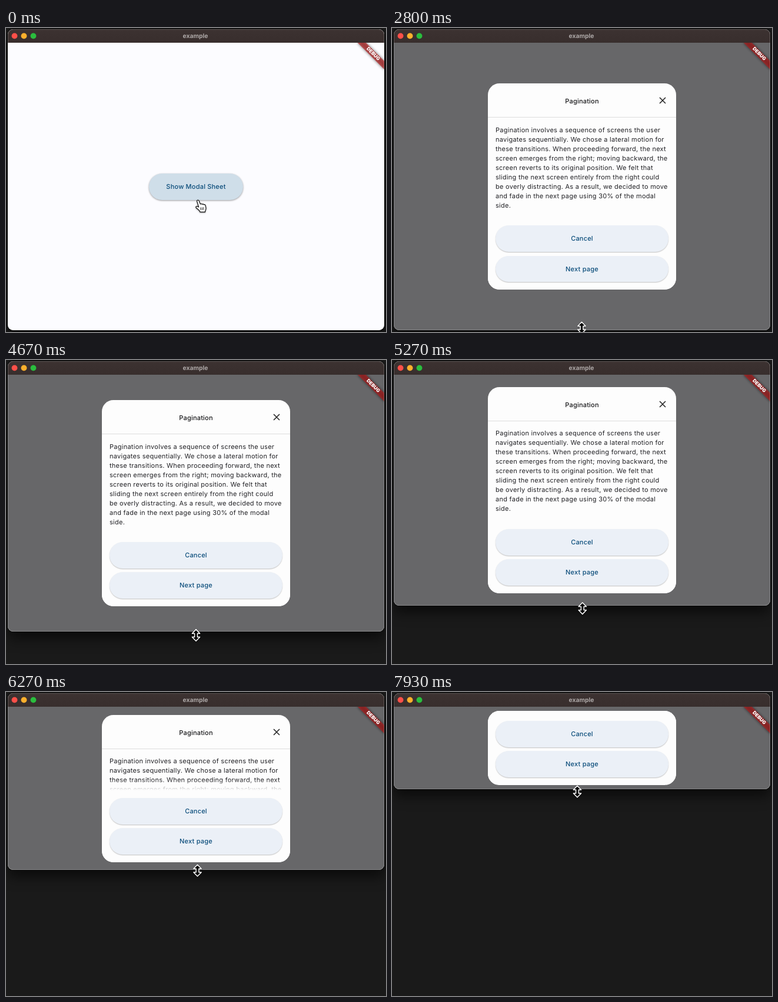
Write an HTML page that moves like this. It is 646 by 516 pixels and loops after 8000 ms.

```html
<!DOCTYPE html>
<html lang="en">
<head>
<meta charset="utf-8">
<title>Modal sheet</title>
<style>
html, body { margin: 0; width: 100%; height: 100%; overflow: hidden; background: #1a1a1a; }
body { position: relative; font: 400 11px/16px Inter, "Open Sans", sans-serif; text-rendering: geometricPrecision; }
div, svg { position: absolute; box-sizing: border-box; }
#win { left: 3px; top: 2px; width: 640px; border-radius: 9px; overflow: hidden; background: #fcfcff; }
#shadow, #rim { left: 3px; top: 2px; width: 640px; border-radius: 9px; }
#shadow { box-shadow: 0 0 0 1px #060606, 0 11px 22px rgba(0,0,0,.6); }
#rim { border: 1px solid rgba(255,255,255,.2); }
#bar { width: 640px; height: 23px; background: linear-gradient(#3c3231, #382e2d);
  font: 700 10.4px/23px Inter, sans-serif; color: #aca7a6; text-align: center; padding-right: 2px; }
#bar svg { left: 0; top: 0; stroke: rgba(0,0,0,.15); stroke-width: .6; }
#barrier { inset: 0; background: #000; }
.btn { height: 44.8px; border-radius: 22.4px; font-weight: 500; line-height: 45px; letter-spacing: .2px;
  text-align: center; color: #0b4d7b; background: #ebf0f7; box-shadow: 0 1px 1.5px rgba(0,0,0,.24); }
#show { left: 240px; width: 160px; background: #cfdee9; box-shadow: 0 1px 3px rgba(0,0,0,.4); }
#dialog { left: 160px; width: 320px; border-radius: 19.5px; overflow: hidden; background: #fdfdfd; color: #222226; }
#head { width: 320px; height: 58px; line-height: 60px; border-bottom: 1px solid #dcdcdc; text-align: center;
  font-weight: 500; letter-spacing: .2px; color: #18181a; }
#head svg { left: 291px; top: 23px; }
#text { left: 13px; top: 70.5px; white-space: pre; letter-spacing: .26px; }
#foot { bottom: 0; width: 320px; height: 140px; background: linear-gradient(rgba(253,253,253,0), #fdfdfd 18px); }
#foot .btn { left: 12.8px; width: 294.4px; }
#ribbon { left: 640px; top: 23px; width: 0; height: 0; transform: rotate(45deg); }
#ribbon div { left: -32px; top: 22.4px; width: 64px; height: 9.6px; }
#glow { background: rgba(0,0,0,.55); filter: blur(2.4px); }
#tag { background: rgba(183,28,28,.65); color: #fff; font: 900 8.16px/9.6px Inter, sans-serif; text-align: center; }
#cursors svg { left: 0; top: 0; overflow: visible; filter: drop-shadow(0 1px 1px rgba(0,0,0,.4)); }
</style>
</head>
<body>
<div id="shadow"></div>
<div id="win">
  <div id="show" class="btn">Show Modal Sheet</div>
  <div id="barrier"></div>
  <div id="dialog">
    <div id="head">Pagination
      <svg width="12" height="12"><path d="M1 1L11 11M11 1L1 11" stroke="#262626" stroke-width="1.6"/></svg>
    </div>
    <div id="text">Pagination involves a sequence of screens the user
navigates sequentially. We chose a lateral motion for
these transitions. When proceeding forward, the next
screen emerges from the right; moving backward, the
screen reverts to its original position. We felt that
sliding the next screen entirely from the right could
be overly distracting. As a result, we decided to move
and fade in the next page using 30% of the modal
side.</div>
    <div id="foot">
      <div class="btn" style="bottom:64px">Cancel</div>
      <div class="btn" style="bottom:12.8px">Next page</div>
    </div>
  </div>
  <div id="ribbon"><div id="glow"></div><div id="tag">DEBUG</div></div>
  <div id="bar">example
    <svg width="60" height="23">
      <circle cx="11.5" cy="11.5" r="5" fill="#fd5049"/>
      <circle cx="27.5" cy="11.5" r="5" fill="#fdb02d"/>
      <circle cx="43.5" cy="11.5" r="5" fill="#2bbd3e"/>
    </svg>
  </div>
</div>
<div id="rim"></div>
<div id="cursors">
  <svg id="hand" width="22" height="24" fill="#fff" stroke="#111" stroke-width="1.2" stroke-linejoin="round">
    <path d="M4.2 1.4c1.2-.8 2.5 0 3 1.2L9.4 8c1-1.2 2.6-.8 3 .4c1-1 2.6-.6 2.9.6c1.2-.7 2.5-.1 2.8 1.2l.8 4.2c.3 2-.6 3.4-1.2 5.1l-.3 1.9H9c-.6-2.6-3.4-4.4-6.2-6.7c-2-1.6-.6-3.6 1.4-3l2.4 1.2L3.7 3.1c-.3-.8 0-1.3.5-1.7z"/>
    <path d="M9.6 13.6l.5 4.6M12.2 13.4l.4 4.6M14.7 13.2l.3 4.6" stroke-width=".9"/>
  </svg>
  <svg id="arrow" width="16" height="24">
    <path d="M.5.5V18.5L4.6 14.7L7.6 21.8L10.7 20.5L7.7 13.6H13.2z" fill="#000" stroke="#fff" stroke-width="1.2"/>
  </svg>
  <svg id="resize" width="1" height="1">
    <path d="M0-9.8L6.6-3H2.4V3H6.6L0 9.8L-6.6 3H-2.4V-3H-6.6z" fill="#000" stroke="#fff" stroke-width="1.5" stroke-linejoin="round"/>
  </svg>
</div>
<script>
const $ = id => document.getElementById(id);
const FRAME = 1000 / 15, LOOP = 8000;

// [time, value] points
const bottom = [[3200, 513.4], [3470, 509], [3870, 498.5], [4070, 491], [4670, 461], [4930, 449],
  [5800, 366], [6270, 302], [6470, 286], [6670, 286], [7530, 197], [7930, 165]];
const pointerX = [[3070, 322.5], [4670, 323], [5800, 324.5], [6270, 325.5], [6670, 325], [7930, 315]];
const gap = [[3270, 3], [3870, 3], [4670, 6], [5800, 3.5], [6270, 0.5], [6670, 2.5], [7930, 4]];
const drop = [[1930, 286], [2200, 400], [2470, 505], [2670, 505], [3070, 517]];

function at(points, t) {
  const i = points.findIndex(p => p[0] > t);
  if (i < 0) return points[points.length - 1][1];
  if (!i) return points[0][1];
  const [t0, a] = points[i - 1], [t1, b] = points[i];
  return a + (b - a) * (t - t0) / (t1 - t0);
}
const ramp = (t, from, to) => Math.min(1, Math.max(0, (t - from) / (to - from)));

function draw(ms) {
  const t = Math.floor((ms + 4) / FRAME) * FRAME;
  const b = at(bottom, t), space = b - 25;
  for (const id of ["win", "shadow", "rim"]) $(id).style.height = b - 2 + "px";

  const h = Math.min(350, space * 0.9), middle = 23 + space / 2;
  $("show").style.top = middle - 22.4 + "px";
  $("dialog").style.height = h + "px";
  $("dialog").style.top = middle - h / 2 + "px";
  $("dialog").style.opacity = ramp(t, 800, 1000);
  $("barrier").style.opacity = 0.588 * ramp(t, 800, 1160);

  const kind = t < 1060 ? "hand" : t < 2720 ? "arrow" : "resize";
  for (const id of ["hand", "arrow", "resize"]) $(id).style.display = id === kind ? "block" : "none";
  const x = kind === "hand" ? 321 : kind === "arrow" ? 321.5 : at(pointerX, t);
  const y = kind === "hand" ? 291 : t < 3200 ? at(drop, t) : b + at(gap, t);
  $(kind).style.transform = `translate(${x}px, ${y}px)`;
}

const start = performance.now();
function tick() {
  draw((performance.now() - start) % LOOP);
  requestAnimationFrame(tick);
}
tick();
</script>
</body>
</html>
```
